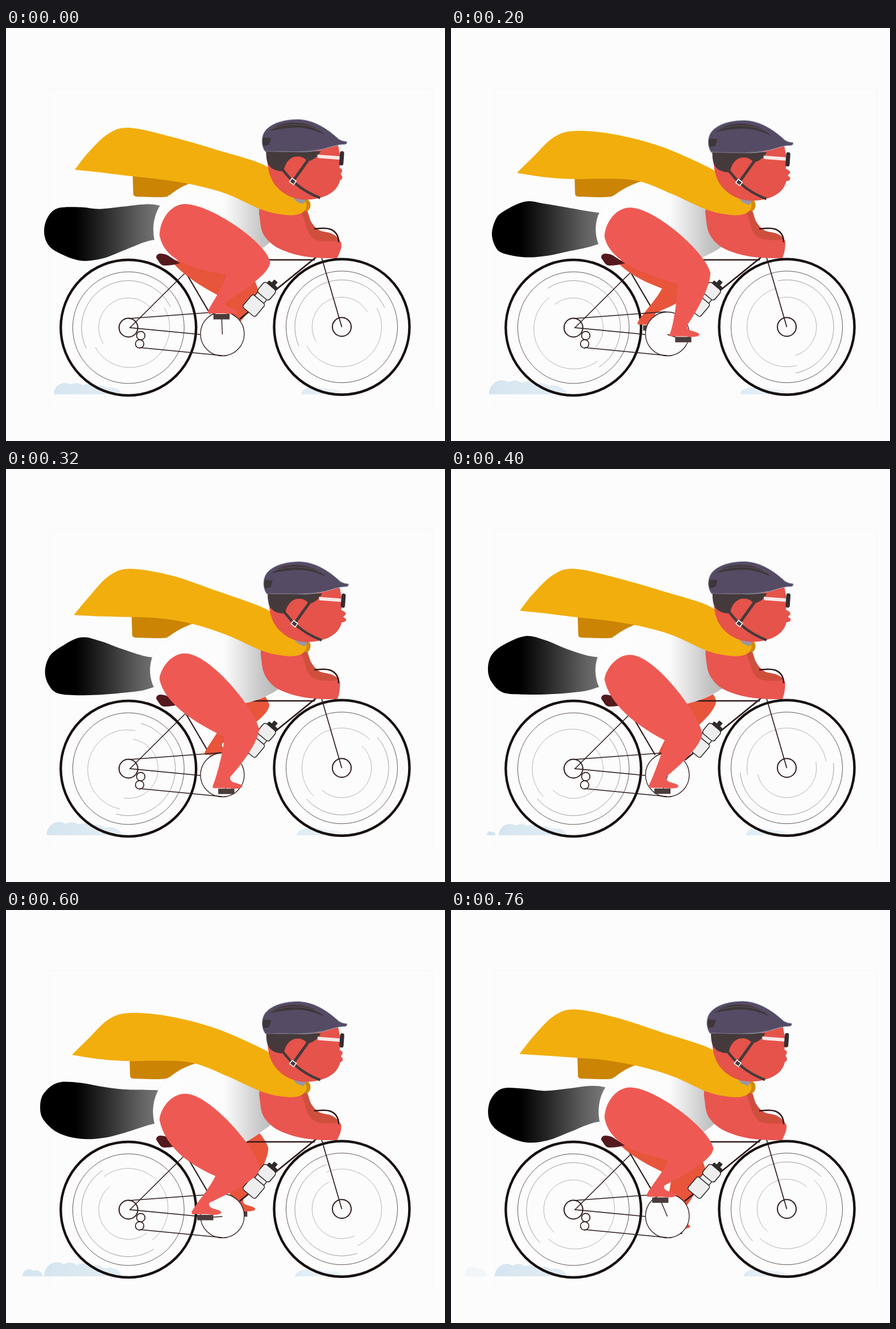
An HTML page with a canvas that plays this animation: 772x725 px, repeating every 0.8 s.

```html
<!DOCTYPE html>
<html lang="en">
<head>
<meta charset="utf-8">
<title>Cyclist</title>
<style>
html, body { margin: 0; width: 100%; height: 100%; overflow: hidden; background: #fcfcfc; }
canvas { display: block; width: 772px; height: 725px; }
</style>
</head>
<body>
<canvas id="stage" width="772" height="725"></canvas>
<script>
const ctx = document.getElementById('stage').getContext('2d');
const LOOP = 800, STEP = 40, RAD = Math.PI / 180;
const BG = '#fcfcfc', LINE = '#2f1b1c', RED = '#ee5a53', ORANGE = '#e8553b', DARK = '#453a3b';
const cos = deg => Math.cos(deg * RAD), sin = deg => Math.sin(deg * RAD);

function paint(fill, stroke, width) {
  if (fill) { ctx.fillStyle = fill; ctx.fill(); }
  if (stroke) { ctx.strokeStyle = stroke; ctx.lineWidth = width; ctx.stroke(); }
}

// Closed smooth outline through the points.
function blob(pts, fill) {
  const n = pts.length, at = i => pts[(i + n) % n];
  ctx.beginPath();
  ctx.moveTo(...pts[0]);
  for (let i = 0; i < n; i++) {
    const [a, b, c, d] = [at(i - 1), at(i), at(i + 1), at(i + 2)];
    ctx.bezierCurveTo(b[0] + (c[0] - a[0]) / 6, b[1] + (c[1] - a[1]) / 6,
      c[0] - (d[0] - b[0]) / 6, c[1] - (d[1] - b[1]) / 6, c[0], c[1]);
  }
  ctx.closePath();
  paint(fill);
}

function shape(path, fill, stroke, width) {
  const p = new Path2D(path);
  if (fill) { ctx.fillStyle = fill; ctx.fill(p); }
  if (stroke) { ctx.strokeStyle = stroke; ctx.lineWidth = width; ctx.stroke(p); }
}

function arc(x, y, r, stroke, width, from = 0, sweep = 360, fill) {
  ctx.beginPath();
  ctx.arc(x, y, r, from * RAD, (from + sweep) * RAD);
  paint(fill, stroke, width);
}

function box(x, y, w, h, r, fill, stroke, width) {
  ctx.beginPath();
  ctx.roundRect(x, y, w, h, r);
  paint(fill, stroke, width);
}

function posed(x, y, angle, drawPart) {
  ctx.save();
  ctx.translate(x, y);
  ctx.rotate(angle * RAD);
  drawPart();
  ctx.restore();
}

function fade(x0, x1, ...stops) {
  const g = ctx.createLinearGradient(x0, 0, x1, 0);
  stops.forEach(([at, color]) => g.addColorStop(at, color));
  return g;
}

// Row of overlapping bumps that get lower to the right.
function cloud(left, right, height, bumps, fill) {
  const step = (right - left) / (bumps + 1);
  ctx.beginPath();
  for (let i = 0; i < bumps; i++) {
    const x = left + step * (i + 1);
    ctx.moveTo(x - step, 643);
    ctx.ellipse(x, 643, step, height * (1 - 0.6 * (i / bumps) ** 2), 0, Math.PI, 2 * Math.PI);
  }
  paint(fill);
}

function clouds(t) {
  const grow = Math.sin(Math.PI * (t % 400 / 400) ** 1.3);
  const left = 84 - 18 * grow, small = 519 - 11 * grow;
  cloud(left, 203, 20 + 5 * grow, 5, fade(left, 203, [0, '#d5e5f0'], [1, '#e2edf4']));
  cloud(small, 592, 12, 3, fade(small, 592, [0, '#dcebf5'], [1, '#eef5f9']));
  if (t < 400) return;
  const u = t / 400 - 1, rest = (1 - u) ** 3;
  ctx.globalAlpha = 1 - u ** 3;
  cloud(24 + 39 * rest, 62 + 16 * rest, 7 + 11 * u, 2, '#cfe3f0');
  ctx.globalAlpha = 1;
}

function wheel(x, y, turn, wobble) {
  arc(x, y, 119, '#17100f', 4.4);
  arc(x, y, 98, '#65575a', 1);
  arc(x, y, 82.5, '#969194', 0.9, turn, 180);
  arc(x, y, 52.3, '#a5a0a2', 0.8, turn - 6, 180);
  arc(x + wobble * cos(turn - 156), y + wobble * sin(turn - 156), 70, '#a5a0a2', 0.8, turn + 176, 180);
  arc(x, y, 16.5, LINE, 2);
}

// Heel position for a crank angle measured clockwise from the top.
const heel = crank => [356.5 + 30 * sin(crank), 531 - 30 * cos(crank)];

function leg(crank, color) {
  const lift = cos(crank - 30), [fx, fy] = heel(crank);
  const tx = 315, ty = 317 - 9.5 * lift, hipY = 367 - 3.5 * lift;
  const kx = 454 + 12.5 * lift, ky = 435 - 29 * lift;
  const ix = 385 + 17 * cos(crank - 75), iy = 453 - 24 * lift;
  const ax = fx + 31, ay = fy - 20;
  box(fx + 9.5, fy + 1, 28.5, 9.5, 0, '#4b3c3c');
  ctx.beginPath();
  ctx.moveTo(270, hipY);
  ctx.bezierCurveTo(270, ty + 30, 288, ty, tx, ty);
  ctx.bezierCurveTo(tx + 43, ty, kx - 8, ky - 36, kx, ky);
  ctx.bezierCurveTo(kx, ky + 18, ax + (kx - ax) * 0.45 + 6, ay + (ky - ay) * 0.45 + 6, ax, ay);
  ctx.bezierCurveTo(ax - 3, ay + 9, ax + 8, ay + 10, ax + 13, ay + 12);
  ctx.bezierCurveTo(fx + 52, fy - 6, fx + 55, fy - 2, fx + 48, fy);
  ctx.quadraticCurveTo(fx + 40, fy + 2, fx + 28, fy);
  ctx.lineTo(fx + 2, fy);
  ctx.quadraticCurveTo(fx - 1, fy, fx, fy - 4);
  ctx.bezierCurveTo(fx + 6, fy - 17, ix + (fx + 10 - ix) * 0.35, iy + (fy - iy) * 0.35, ix, iy);
  ctx.bezierCurveTo(ix - 55, iy - (iy - 420) * 0.45 - 3, 279, 411, 270, hipY);
  paint(color);
}

function tail(turn) {
  const wave = (x, y, amp) => [x, y + amp * cos(1.5 * (x - 140)) * cos(turn - 0.2 * (150 - x))];
  const sway = 8 * cos(turn - 70), x = 66 + 6 * cos(turn - 80), y = 354 + sway;
  blob([
    [x, y], [x + 6, y - 24], [91, 313 + 1.3 * sway],
    wave(130, 304, 11), wave(165, 309, 11), wave(205, 315, 11), wave(245, 319, 11), wave(272, 321, 10),
    [305, 325], [305, 362],
    wave(250, 380, 6.5), wave(210, 391, 6.5), wave(170, 400, 6.5), wave(130, 402, 6.5),
    [91, 393 + 0.3 * sway], [x + 6, y + 22]
  ], fade(64, 272, [0, '#000'], [0.28, '#000'], [0.5, '#252525'], [0.8, '#5c5c5c'], [1, '#7a7a7a']));
}

// The flutter runs along the cloth twice per loop and is widest at the free end.
function cape(flap) {
  const wave = (x, y) => [x, y + (3.4 + 0.08 * Math.max(0, 180 - x)) * cos(flap - 250 + 1.2 * (x - 130))];
  const tip = [118.5 + 2.5 * cos(flap), 251.5 + 6.5 * cos(flap - 245)];
  blob([tip, tip,
    wave(145, 222), wave(180, 189), wave(218, 178), wave(290, 189), wave(370, 211), wave(450, 241),
    [478, 262], [498, 288], [526, 305], [526, 319], [514, 327], [490, 328], [450, 319], [390, 292],
    wave(330, 272), wave(270, 265), wave(210, 262), wave(160, 257), tip], '#f2ae0d');
}

function capeUnderside(flap) {
  const x = 220 + 2.8 * cos(flap);
  shape(`M${x} 258L${x + 1} 291Q${x + 1} 296 ${x + 8} 296L${x + 40} 297Q${x + 65} 297 284 295L345 268V255Z`, '#cb8404');
}

function torso(sway) {
  const left = 260 - 6.5 * sway;
  shape(`M${left} 352C${left + 1} 325 ${272 - 4 * sway} 308 ${284 - sway} 297C300 283 ${315 + 4 * sway} 274 345 266L440 262L510 320` +
    `L${468 + 11 * sway} ${371 + 16 * sway}Q${445 + 5 * sway} ${390 + 16 * sway} 414 412L285 407C${268 - 3 * sway} 397 ${left} 378 ${left} 352Z`,
    fade(250, 472, [0, '#fdfdfd'], [0.6, '#fcfcfc'], [0.68, '#eeeeee'], [0.9, '#c6c6c6'], [1, '#bababa']), '#f5f0f0', 0.6);
}

function bottle() {
  const ink = '#302a2b', body = '#eeeeee';
  posed(436, 487, 40, () => {
    box(-2, -58, 8, 9, 1, ink);
    box(-8, -51, 20, 8, 2, ink);
    box(-10, -24, 21, 12, 0, body, ink, 1.5);
    box(-12.5, -45, 27, 23, 5, body, ink, 1.6);
    box(-14.5, -14, 29, 29, 4, body, ink, 1.6);
  });
}

function drivetrain([fx, fy]) {
  arc(380.5, 537, 38.5, LINE, 1.3, 0, 360, BG);
  shape('M216 510L378 498M235 561L380 575', null, LINE, 1.5);
  arc(237, 540, 7.4, LINE, 1.7);
  arc(235, 554.5, 7.4, LINE, 1.7);
  shape(`M380.5 538L${fx + 24} ${fy + 6}`, null, LINE, 1.4);
}

function arms(dx) {
  blob([[514, 315], [528, 318], [537, 341 - dx / 3], [551, 355], [573, 361], [587 - dx / 3, 374 - dx], [572, 380], [540, 376], [522, 355]], '#cf4f3d');
  blob([[449 + dx, 312], [446.5 + dx, 338], [454 + dx, 365], [480, 387], [525, 401], [577, 404], [584, 400], [590 - dx, 384],
    [587 - dx / 2, 374 - dx], [570, 375 - dx], [545, 372 - dx], [531, 357], [519, 325], [490, 300]], '#e9554f');
  shape('M542 352.5C552 352 560 350 570 353C580 357 585 364 585 376', null, '#30191a', 2.5);
}

function head(pout) {
  shape('M501 293L528 300L522 309L510 304Z', '#9897a4');
  const lipX = 590.5 + 4.5 * pout, lipY = 251 + pout;
  shape(`M459 225C459 252 466 271 481 284C496 297 513 302 531 301C556 300 582 290 587 267Q${lipX + 1} ${lipY + 14} ${lipX} ${lipY + 9}` +
    `L${588 + 2 * pout} ${lipY + 5}L${lipX} ${lipY}Q${591 + 2 * pout} 247 586 245Q590 232 583 203L530 208Z`, '#e5534a');
  shape('M457 215C457 231 459 240 467 246Q476 252 488 251C490 240 495 230 506 226Q519 223 527 231L534 233Q547 228 553 216Z', DARK);
  shape('M486 248C496 261 513 283 552 298', null, DARK, 4.5);
  shape('M532 230L504 269', null, DARK, 5);
  posed(504, 269, 37, () => box(-4.5, -3.8, 9, 7.6, 0, DARK, '#fff', 1.6));

  shape('M455 216C449 208 448 194 453 184C462 168 486 160 514 160C543 161 568 179 585 195Q592 199 599 199Q600 203 596 204Q586 204 576 207C557 213 542 217 520 217Z', '#554b64', '#a9b7c9', 0.9);
  shape('M455 216Q520 219 560 211', null, '#695f72', 1.3);
  shape('M464 180C474 171 488 166 507 166C529 166 548 175 560 187C539 177 521 173 500 175C486 176 477 178 464 180Z', '#3e3638');
  shape('M467 177C490 167 527 166 549 179', null, '#6c6374', 0.7);
  shape('M452 192L466 193L462 205L453 207Q449 200 452 192Z', '#3e3638');

  shape('M547 222L588 225V231L548 228Z', '#f7e7e7');
  posed(590, 229, 4, () => box(-3.8, -13, 7.4, 25, 3.6, '#352d31'));
}

function draw(t) {
  const turn = 360 * t / LOOP, flap = 2 * turn;
  const crank = turn + 7 + 16 * sin(turn - 36);
  const sway = (1 + cos(turn - 142)) / 2;

  ctx.fillStyle = BG;
  ctx.fillRect(0, 0, 772, 725);
  shape('M76.5 670V106.5H749.5V670', null, '#f6f6f6', 1);

  clouds(t);
  wheel(215.3, 526, turn + 147 + 7 * cos(turn), 2.5);
  wheel(590.5, 524.7, turn + 165 + 10 * cos(turn - 155), 0);
  shape('M342 538L218 526L322 423', null, LINE, 1.6);
  shape('M306 412L359 502', null, LINE, 2.2);
  shape('M555 403L590.5 525', null, LINE, 1.7);
  tail(turn);
  leg(crank + 180, ORANGE);
  drivetrain(heel(crank));
  shape('M400 407H543', null, LINE, 2.4);
  shape('M547 401L411 511', null, LINE, 2.8);
  bottle();

  capeUnderside(flap);
  torso(sway);
  shape('M264 403Q264 397 271 396Q282 396 289 402L306 413Q292 417 279 417Q273 417 270 412Z', '#54191d');
  arms(3 * sway);
  leg(crank, RED);
  ctx.beginPath();
  ctx.ellipse(528, 311, 7.5, 10.5, 0, 0, 2 * Math.PI);
  paint('#d28a08');
  cape(flap);
  posed(3.1 * sway, 2.6 * sway, 0, () => head(sway));
}

function tick() {
  draw(Math.floor((performance.now() % LOOP) / STEP) * STEP);
  requestAnimationFrame(tick);
}
tick();
</script>
</body>
</html>
```
